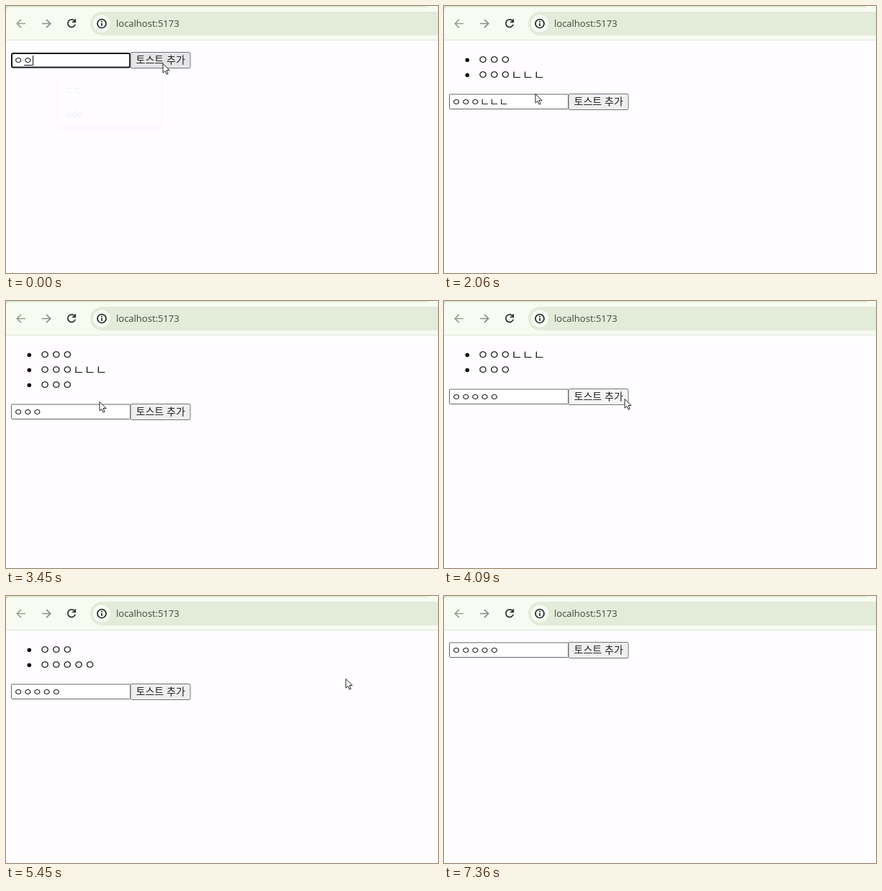
Animation of 600 by 372 pixels, one loop 8.67 s. Source, as an HTML page:

```html
<!DOCTYPE html>
<html lang="ko">
<head>
<meta charset="utf-8">
<title>Toast list</title>
<style>
  html, body { margin: 0; width: 100%; height: 100%; overflow: hidden; background: #fffdff; }
  svg { display: block; width: 600px; height: 372px; }
  text { font-family: "Noto Sans CJK KR", "Noto Sans CJK", "Noto Sans CJK JP", sans-serif; font-weight: 300; fill: #222; white-space: pre; }
  .url { font: 13px "Open Sans", "Noto Sans", sans-serif; fill: #41463e; }
  .item { font-size: 17px; }
  .field { font-size: 14.4px; }
  .label { font-size: 14px; }
  .icon { fill: none; stroke-width: 1.7; }
  .faint { font-size: 13px; fill: #f0eff8; }
</style>
</head>
<body>
<svg viewBox="0 0 600 372">
  <rect width="600" height="372" fill="#fffdff"/>

  <g id="toolbar">
    <rect width="600" height="48" fill="#d5e9c8"/>
    <path d="M0 48V7Q0 1.5 6 1.5H582Q587 1.5 588 0H600V48Z" fill="#f7fbf1"/>
    <rect y="47" width="600" height="1" fill="#dce7d4"/>
    <rect x="117" y="8" width="520" height="33" rx="16.5" fill="#e3ebd9"/>
    <circle cx="133" cy="24.5" r="12" fill="#f9fcf5"/>
    <circle class="icon" cx="133" cy="24.5" r="6" stroke="#20231e"/>
    <path class="icon" stroke="#20231e" d="M133 23.8v4M133 20.8v1.7"/>
    <path class="icon" stroke="#9a9f95" d="M27 24.5H15.5M21 18.8L15.3 24.5L21 30.2"/>
    <path class="icon" stroke="#8b9086" d="M50 24.5H61.5M56 18.8L61.7 24.5L56 30.2"/>
    <path class="icon" stroke="#2e322a" d="M95.6 21.2A5.3 5.3 0 1 0 96.2 25.8M96.3 18.2V22.4H92"/>
    <text class="url" x="153" y="29">localhost:5173</text>
  </g>

  <g id="list"></g>

  <g id="popup">
    <rect x="71" y="96" width="147" height="76" rx="3" fill="#faf9fe"/>
    <rect x="73" y="95" width="143" height="73" rx="2" fill="#fffdff"/>
    <text class="faint" x="82" y="122">ㄷㄷ</text>
    <text class="faint" x="83" y="155">ddd</text>
  </g>

  <g id="form">
    <rect id="box" fill="#fff"/>
    <text id="value" class="field" x="10.4" y="81"></text>
    <path id="caret" stroke="#111" d="M0 69V83M-12.5 82.5H-1"/>
    <rect id="button" x="173" y="64.5" width="83" height="22" rx="2" stroke="#75757a"/>
    <text class="label" x="180.5" y="80.4">토스트 추가</text>
  </g>

  <path id="arrow" fill="#fff" stroke="#222"
        d="M.5 .5V13.2L3.5 10.5L5.6 15.2L7.6 14.3L5.5 9.6H9.6Z"/>
  <path id="ibeam" fill="none" stroke="#222"
        d="M-2.5 -5.5H-.5L0 -5L.5 -5.5H2.5M0 -5V5M-2.5 5.5H-.5L0 5L.5 5.5H2.5"/>
</svg>
<script>
const LOOP = 8670;
const LIFE = 3020;     // how long a toast stays
const HOLD = 100;      // button press before the toast appears
const KEY = 120;       // time between keystrokes
const TRAVEL = 280;    // pointer trip between field and button
const PITCH = 13.25;   // width of one letter in the field
const ROW = 21;

// Each round: focus the field, edit its text, press the button, add a toast.
const rounds = [
  { focus: 0, add: 500, text: "ㅇㅇㅇ", button: [218, 80] },
  { focus: 1020, add: 1830, text: "ㅇㅇㅇㄴㄴㄴ", field: [121, 115], button: [212, 107] },
  { focus: 2300, add: 3070, text: "ㅇㅇㅇ", field: [119, 123], button: [212, 127] },
  { focus: 3560, add: 4180, text: "ㅇㅇㅇㅇㅇ", field: [130, 140], button: [251, 136] },
];

const $ = id => document.getElementById(id);
const set = (el, attrs) => { for (const k in attrs) el.setAttribute(k, attrs[k]); };
const show = (el, on) => set(el, { visibility: on ? "visible" : "hidden" });
const move = (el, x, y) => set(el, { transform: `translate(${x} ${y})` });
const clamp = u => Math.min(1, Math.max(0, u));
const ease = u => u * u * (3 - 2 * u);

// Build keystrokes and pointer trips from the rounds.
const keys = [{ at: 0, text: "ㅇㅇ" }];
const trips = [];
const travel = (at, to, time = TRAVEL) => trips.push({ at, to, time });

rounds.forEach((round, i) => {
  if (round.field) travel(rounds[i - 1].add, round.field);
  let text = keys.at(-1).text;
  let at = round.focus;
  while (text !== round.text) {
    text = round.text.startsWith(text) ? round.text.slice(0, text.length + 1) : text.slice(0, -1);
    keys.push({ at: at += KEY, text });
  }
  if (round.field) travel(at, round.button);
});
travel(4550, [472, 115], 890);
travel(6150, [516, 60], 760);
travel(6940, [578, -18], 400);

function pointerAt(t) {
  let [x, y] = rounds[0].button;
  for (const { at, to, time } of trips) {
    const e = ease(clamp((t - at) / time));
    x += (to[0] - x) * e;
    y += (to[1] - y) * e;
  }
  return [x, y];
}

let listed = null;
function drawList(items) {
  const key = items.join();
  if (key === listed) return;
  listed = key;
  $("list").innerHTML = items.map((text, i) =>
    `<circle cx="32.3" cy="${75.3 + ROW * i}" r="2.8" fill="#111"/>` +
    `<text class="item" x="46.3" y="${81 + ROW * i}">${text}</text>`).join("");
}

function draw(t) {
  const items = rounds.filter(r => t >= r.add && t < r.add + LIFE).map(r => r.text);
  const shift = items.length ? 16 + ROW * items.length : 0;
  drawList(items);
  move($("form"), 0, shift);

  const { text } = keys.findLast(key => key.at <= t);
  const focus = rounds.some(r => t >= r.focus && t < r.add - HOLD);
  const pressed = rounds.some(r => t >= r.add - HOLD && t < r.add);
  $("value").textContent = text;
  set($("box"), focus
    ? { x: 8, y: 66, width: 164, height: 19.5, rx: 2, stroke: "#15151c", "stroke-width": 2 }
    : { x: 7.5, y: 65, width: 165, height: 20.5, rx: 1, stroke: "#66666c", "stroke-width": 1 });
  show($("caret"), focus);
  move($("caret"), Math.round(10.4 + PITCH * text.length) + .5, 0);

  const [x, y] = pointerAt(t);
  const onForm = y >= shift + 65 && y < shift + 87 && x >= 7 && x < 257;
  const onField = onForm && x < 173;
  set($("button"), { fill: pressed ? "#f5f5f5" : onForm && !onField ? "#e5e5e7" : "#efefef" });
  show($("arrow"), !onField);
  show($("ibeam"), onField);
  for (const id of ["arrow", "ibeam"]) move($(id), Math.round(x) - .5, Math.round(y));

  set($("popup"), { opacity: 1 - clamp((t - 30) / 60) });
}

const start = performance.now();
function frame() {
  draw((performance.now() - start) % LOOP);
  requestAnimationFrame(frame);
}
frame();
</script>
</body>
</html>
```
